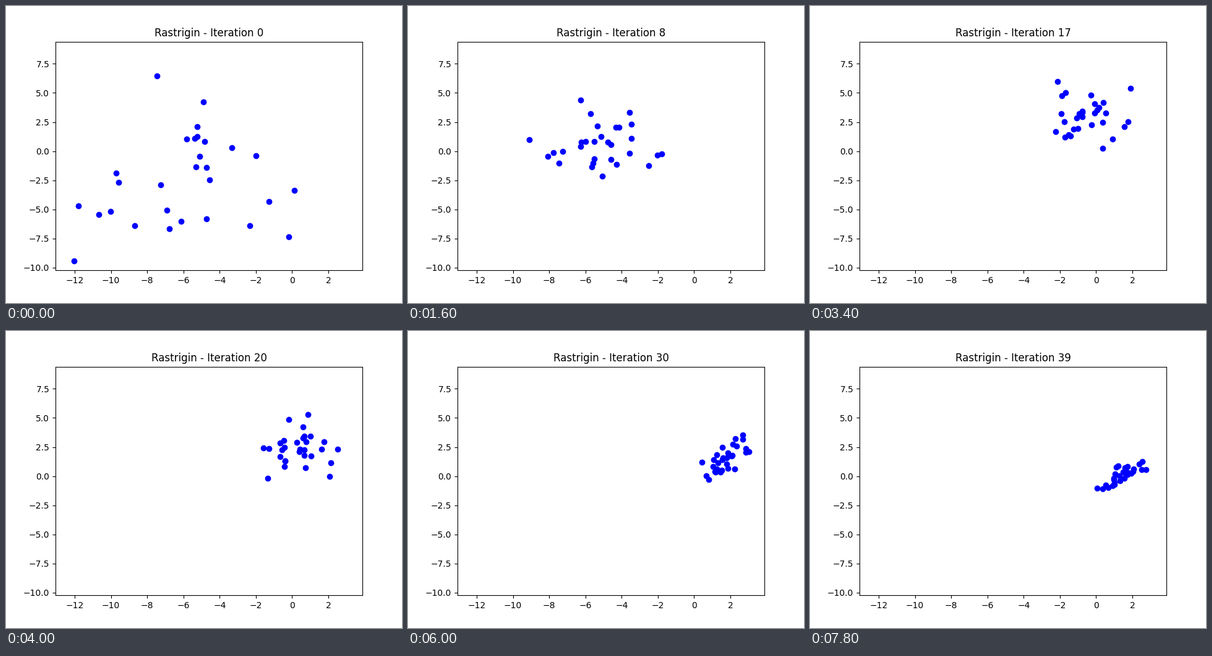
A matplotlib script for the animation above (8 s loop, 640 px wide and 480 px high).

```python
import numpy as np
import matplotlib.pyplot as plt
from matplotlib.animation import FuncAnimation

FRAMES = 40
STEP_MS = 200
PARTICLES = 30

# Iteration, mean x, mean y, spread x, spread y, correlation.
WAYPOINTS = np.array([
    (0, -6.20, -2.63, 3.50, 3.75, 0.25),
    (4, -7.96, -2.10, 2.10, 1.55, 0.10),
    (13, -1.68, 3.85, 1.30, 1.55, -0.10),
    (20, 0.35, 2.35, 1.05, 1.25, 0.05),
    (26, 0.00, 1.00, 0.68, 1.10, 0.25),
    (30, 1.75, 1.50, 0.68, 1.00, 0.70),
    (39, 1.45, 0.10, 0.65, 0.65, 0.80),
])

rng = np.random.default_rng(7)
cosine, sine = rng.normal(size=(2, PARTICLES, 2))
speed = rng.uniform(0.5, 1.0, PARTICLES) * rng.choice([-1, 1], PARTICLES)


def whiten(points):
    """Shift and scale a cloud to zero mean and unit covariance."""
    factor = np.linalg.cholesky(np.cov(points.T))
    return np.linalg.solve(factor, (points - points.mean(axis=0)).T).T


def swarm(n):
    """Particles swing around a centre that travels between waypoints."""
    angle = (speed * n)[:, None]
    u, v = whiten(np.cos(angle) * cosine + np.sin(angle) * sine).T
    mx, my, sx, sy, rho = (
        np.interp(n, WAYPOINTS[:, 0], column) for column in WAYPOINTS[:, 1:].T
    )
    x = mx + sx * u
    y = my + sy * (rho * u + np.sqrt(1 - rho ** 2) * v)
    return np.column_stack([x, y])


fig, ax = plt.subplots(figsize=(6.4, 4.8), dpi=100)
ax.set_xlim(-13.061, 3.882)
ax.set_ylim(-10.2257, 9.4005)
dots = ax.scatter(*swarm(0).T, color="blue")
title = ax.set_title("Rastrigin - Iteration 0")


def draw(n):
    dots.set_offsets(swarm(n))
    title.set_text(f"Rastrigin - Iteration {n}")
    return dots, title


anim = FuncAnimation(fig, draw, frames=FRAMES, interval=STEP_MS,
                     repeat=True, repeat_delay=0, blit=False)
plt.show()
```
